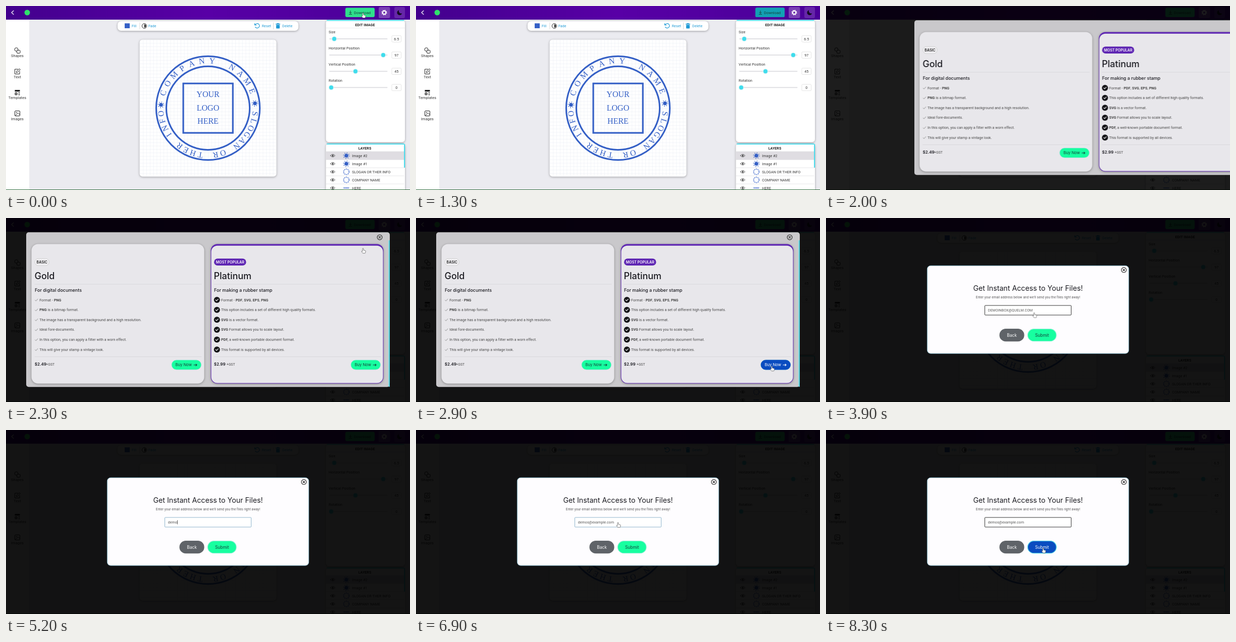
These frames come from a looping animation (800 by 364 pixels, 8.4 s). An HTML page:

```html
<!DOCTYPE html>
<html lang="en">
<head>
<meta charset="utf-8">
<title>Stamp editor</title>
<style>
html, body { margin: 0; width: 100%; height: 100%; overflow: hidden; background: #ebebf0; }
svg { display: block; width: 800px; height: 364px; }
text { font: 7px Roboto, sans-serif; letter-spacing: .1px; fill: #333; white-space: pre; }
.b { font-weight: 700; fill: #222; }
.m { text-anchor: middle; }
.side { font-size: 7.4px; }
.link { fill: #1f9ad6; }
.geo { font-family: Inter, sans-serif; letter-spacing: 0; fill: #1c1c22; }
.serif { font: 16px "Liberation Serif", serif; letter-spacing: 0; fill: #3560c6; }
.list { fill: #444; }
.line { fill: none; stroke: #222; stroke-width: 1; stroke-linecap: round; stroke-linejoin: round; }
.blue { fill: none; stroke: #3560c6; stroke-width: 3.2; }
.card { filter: drop-shadow(0 1px 2px #0005); }

.anim { animation: 8.4s linear infinite; }
.busy { animation-name: busy; }
.shade { animation-name: shade; }
.plans { animation-name: plans; }
.mail { animation-name: mail; }
.hand { animation-name: hand; }
.buy-hover { animation-name: buy; animation-timing-function: step-end; }
.sub-hover { animation-name: submit; animation-timing-function: step-end; }
.field { animation-name: field; animation-timing-function: step-end; }
.hand-on { animation-name: seen; animation-timing-function: step-end; }

@keyframes busy { 0%, 7.1% { opacity: 0 } 8.4%, 21% { opacity: 1 } 21.43%, 100% { opacity: 0 } }
@keyframes shade {
  0%, 21.43% { opacity: 0; animation-timing-function: ease }
  24.6%, 100% { opacity: .92 }
}
@keyframes plans {
  0%, 21.92% { transform: translateX(800px); animation-timing-function: ease }
  25.5%, 34.85% { transform: none; animation-timing-function: ease }
  37.9%, 100% { transform: translateX(800px) }
}
@keyframes mail {
  0%, 34.85% { transform: translateX(-800px); animation-timing-function: ease }
  37.9%, 100% { transform: none }
}
@keyframes hand {
  0%, 7.14% { transform: translate(707px, 14px) }
  27.38% { transform: translate(707px, 60px); animation-timing-function: ease-in-out }
  32.14%, 39.29% { transform: translate(704.5px, 293px); animation-timing-function: ease-in-out }
  47.62%, 82.14% { transform: translate(400px, 183px); animation-timing-function: ease-in-out }
  89.29%, 100% { transform: translate(430px, 233.5px) }
}
@keyframes seen { 0% { opacity: 1 } 7.14% { opacity: 0 } 27.38% { opacity: 1 } 51.19% { opacity: 0 } 82.14%, 100% { opacity: 1 } }
@keyframes buy { 0% { opacity: 0 } 32% { opacity: 1 } 40% { opacity: 0 } 100% { opacity: 0 } }
@keyframes submit { 0% { opacity: 0 } 88.1%, 100% { opacity: 1 } }
@keyframes field { 0% { stroke: #333 } 50% { stroke: #8fb4cc } 94.05%, 100% { stroke: #333 } }
</style>
</head>
<body>
<svg id="stage" viewBox="0 0 800 364"></svg>
<script>
const LOOP = 8400;
const HINT = 'DEMOINBOX@QUELM.COM';
const TYPED = 'demos@example.com';

const text = (x, y, s, cls = '', attrs = '') => `<text x="${x}" y="${y}" class="${cls}" ${attrs}>${s}</text>`;
const rect = (x, y, w, h, r, fill, attrs = '') =>
  `<rect x="${x}" y="${y}" width="${w}" height="${h}" rx="${r}" fill="${fill}" ${attrs}/>`;
const circle = (x, y, r, fill, attrs = '') => `<circle cx="${x}" cy="${y}" r="${r}" fill="${fill}" ${attrs}/>`;
const line = (d, attrs = '') => `<path class="line" d="${d}" ${attrs}/>`;
const at = (x, y, s) => `<g transform="translate(${x} ${y})">${s}</g>`;
const paint = (color, width = 1) => `style="stroke:${color};stroke-width:${width}"`;

const sun = (x, y) => at(x, y, circle(0, 0, 3.8, '#3560c6') +
  circle(0, 0, 5.6, 'none', 'stroke="#3560c6" stroke-width="1.6" stroke-dasharray="1.4 3"'));

const eye = (x, y) => at(x, y,
  line('M-4.5 0Q0-5.4 4.5 0Q0 5.4-4.5 0Z', paint('#333', .8)) + circle(0, 0, 1.6, '#333'));

const close = (x, y) => at(x, y,
  line('M-1.7-1.7L1.7 1.7M1.7-1.7L-1.7 1.7', paint('#222', 1.1)) + circle(0, 0, 4.9, 'none', 'stroke="#222" stroke-width="1.1"'));

// Letters set one by one around the stamp, tops outward
const arc = (s, start, step) => [...s].map((c, i) => c === ' ' ? '' :
  text(0, -88.5, c, 'serif m', `transform="translate(400 202) rotate(${start + i * step + 90})"`)).join('');

function header() {
  return rect(0, 0, 800, 27, 0, 'url(#bar)') +
    line('M15 9.3L11 13L15 16.7', paint('#fff', 1.2)) +
    circle(42, 13, 5.5, '#2fe06c') +
    rect(672, 3.5, 58, 18.5, 3, '#2fe08c') +
    rect(672, 3.5, 58, 18.5, 3, '#12a0b4', 'class="anim busy"') +
    line('M682 9.5V14.5M680 12.6L682 14.6L684 12.6M679.3 16.5H684.7', paint('#14403c')) +
    text(689, 15.7, 'Download', '', 'style="font-size:7.3px;fill:#14403c"') +
    rect(738, 2, 22.5, 22, 3, '#ffffff40') +
    circle(749, 13, 3.2, 'none', 'stroke="#fff" stroke-width="2"') +
    circle(749, 13, 4.8, 'none', 'stroke="#fff" stroke-width="1.5" stroke-dasharray="1.9 1.87"') +
    rect(769, 2, 21, 22, 3, '#ffffff26') +
    '<path d="M778 8.3A5 5 0 1 0 784.2 14.6A5 5 0 0 1 778 8.3Z" fill="#120a20"/>';
}

function sidebar() {
  const icons = [
    circle(-2, -2, 3.4, '#fff', 'stroke="#222"') + rect(-1, -.5, 6.5, 6, 1.5, '#fff', 'stroke="#222"'),
    line('M1-4.5H-5V5H4.5V0M-2 2L-1.5-.5L4-5.5L5.8-3.7L.5 1.5Z'),
    rect(-5, -5, 10, 3.4, 0, '#222') + line('M-4.3 1V4.5H-.8V1ZM2.5 1H4.5M2.5 4.5H4.5', paint('#222', 1.3)),
    rect(-5, -5, 10, 10, 1.5, 'none', 'stroke="#222"') + line('M-4 4L1.5-1L5 2.5') + circle(-1.8, -1.8, 1, '#222')
  ];
  return rect(0, 27, 46, 337, 0, '#fff') + ['Shapes', 'Text', 'Templates', 'Images'].map((s, i) =>
    at(22.5, 88 + i * 41.5, icons[i]) + text(22.5, 101 + i * 41.5, s, 'side m')).join('');
}

function toolbar() {
  return rect(221, 30, 358, 19, 7, '#fff', 'class="card"') +
    rect(235, 34.3, 10, 9.7, 0, '#3560c6') + text(249, 42, 'Fill', 'link') +
    line('M265 33V46M529.5 33V46', paint('#ccc', .8)) +
    circle(274, 39.5, 4.7, '#fff', 'stroke="#222"') +
    '<path d="M274 36.3A3.2 3.2 0 0 1 274 42.7Z" fill="#222"/>' + text(282, 42, 'Fade', 'link') +
    line('M493.3 37.2A4.5 4.5 0 1 1 493.6 41.6M492.5 34.5V37.6H495.8', paint('#1f9ad6', 1.2)) +
    text(506.7, 42, 'Reset', 'link') +
    rect(534, 35, 9, 1.5, .5, '#1f9ad6') + rect(536.5, 34, 4, 1.5, .5, '#1f9ad6') +
    rect(535, 37.3, 7, 7.3, 1, '#1f9ad6') + text(547, 42, 'Delete', 'link');
}

function stamp() {
  return rect(264.5, 66.5, 271, 271, 6, '#fff', 'class="card"') + rect(264.5, 66.5, 271, 271, 6, 'url(#grid)') +
    '<circle class="blue" cx="400" cy="202" r="102.6"/><circle class="blue" cx="400" cy="202" r="82.6"/>' +
    '<rect class="blue" x="351" y="153.2" width="98.2" height="97.8"/>' +
    ['YOUR', 'LOGO', 'HERE'].map((s, i) => text(400, 180 + i * 26.7, s, 'serif m')).join('') +
    arc('COMPANY NAME', -161.4, 12.75) + arc('SLOGAN OR THER INFO', 6.7, 9.26) +
    sun(307, 195.5) + sun(493, 192.5);
}

function settings() {
  const rows = [['Size', 650, '6.5'], ['Horizontal Position', 747, '97'], ['Vertical Position', 692, '45'], ['Rotation', 644, '0']];
  return rect(633.5, 27.5, 156.5, 242, 6, '#fff', 'class="card"') + rect(635, 27.5, 153.5, 2, 1, '#4fdcec') +
    text(711, 39.5, 'EDIT IMAGE', 'b m') + line('M634 43.5H790', paint('#e4e4e8', .7)) +
    rows.map(([name, x, value], i) => {
      const y = 65 + i * 32.1;
      return text(639, y - 11, name) + rect(640, y - 1, 115.5, 2, 1, '#e0e0e4') +
        circle(x, y, 5.2, '#d5f3f6') + circle(x, y, 4, '#3fdcec') +
        rect(764, y - 6.3, 18.5, 12.6, 1.5, '#fff', 'stroke="#ddd" stroke-width=".8"') + text(773.2, y + 2.5, value, 'm');
    }).join('');
}

function layers() {
  const ring = y => circle(674, y, 5.4, 'none', 'stroke="#3560c6" stroke-width="1.5" stroke-dasharray="2 1.4"');
  const bar = y => line(`M668.5 ${y}H680`, 'style="stroke:#3560c6;stroke-width:2;stroke-dasharray:1.6 .7;stroke-linecap:butt"');
  const rows = [['Image #2', y => sun(674, y)], ['Image #1', y => sun(674, y)],
    ['SLOGAN OR THER INFO', ring], ['COMPANY NAME', ring], ['HERE', bar]];
  return rect(633.5, 272, 156.5, 100, 6, '#fff', 'class="card"') + rect(635, 272, 153.5, 2, 1, '#4fdcec') +
    text(710.5, 283.6, 'LAYERS', 'b m') + rect(633.5, 288, 154.5, 16, 0, '#dfdde2') +
    rows.map(([name, icon], i) => {
      const y = 296 + i * 16;
      return line(`M634 ${y - 8}H788`, paint('#dcdce0', .7)) + eye(647, y) + icon(y) + text(685.3, y + 2.5, name);
    }).join('') + rect(788, 273, 2.2, 47, 1, '#4fdcec') + rect(0, 363, 800, 1, 0, '#2c6a3a');
}

function buyButton(x, fill, ink, edge) {
  return rect(x, 281, 58.5, 19, 9.5, fill, `stroke="${edge}" stroke-width=".7"`) +
    text(x + 7.5, 293.4, 'Buy Now', 'geo', `style="font-size:7.7px;fill:${ink}"`) +
    line(`M${x + 44} 290.7H${x + 50}M${x + 48} 288.8L${x + 50} 290.7L${x + 48} 292.6`, paint(ink, 1.1));
}

function plan(x, top, badge, name, use, items, price) {
  const bold = s => s.replace(/\*(.+?)\*/g, '<tspan font-weight="700">$1</tspan>');
  const card = top
    ? rect(x - 6.5, 51.5, 342, 276, 13, '#5f27b3') + rect(x - 5.5, 54.8, 340, 271.6, 12, '#e8e7eb')
    : rect(x - 6.5, 51.5, 342, 276, 13, '#e8e7eb');
  const w = top ? 63.5 : 28.5;
  return `<g class="card">${card}</g>` +
    rect(x, 80.3, w, 13.8, 6.9, top ? '#5f27b3' : '#efeef1', top ? '' : 'stroke="#ccc" stroke-width=".8"') +
    text(x + w / 2, 89.9, badge, 'geo m', `style="font-size:7px;font-weight:600;fill:${top ? '#fff' : '#222'}"`) +
    text(x - .5, 120.5, name, 'geo', 'style="font-size:18px;font-weight:500"') +
    text(x, 145.8, use, 'geo', 'style="font-size:9px;font-weight:500"') +
    line(`M${x} 131H${x + 330}M${x} 274.5H${x + 330}`, paint('#d5d4d8', .8)) +
    items.map((s, i) => {
      const y = 162 + i * 19.65;
      const mark = top
        ? circle(x + 5.7, y, 6, '#151518') + line(`M${x + 3.2} ${y}l1.8 1.9 3.3-3.6`, paint('#fff', 1.1))
        : line(`M${x + .6} ${y + .4}l1.7 1.8 3.6-4`, paint('#888', .9));
      return mark + text(x + (top ? 14 : 9.2), y + 2.5, bold(s), 'list');
    }).join('') +
    text(x - .3, 292.2, price, 'geo', 'style="font-size:8px;font-weight:600"') +
    text(x + (top ? 24.7 : 22.3), 292, '+GST', 'list', 'style="font-size:6.8px"') +
    buyButton(x + 271, '#17ffa0', '#14403c', '#8fe0d8');
}

function plans() {
  return `<g class="anim plans">` + rect(40, 28.3, 720, 306, 5, '#c9c8cb') + rect(757.6, 44, 2.4, 290, 1, '#5fdbe6') +
    close(740, 38.2) +
    plan(57, false, 'BASIC', 'Gold', 'For digital documents', ['Format - *PNG*', '*PNG* is a bitmap format.',
      'The image has a transparent background and a high resolution.', 'Ideal fore-documents.',
      'In this option, you can apply a filter with a worn effect.', 'This will give your stamp a vintage look.'], '$2.49') +
    plan(412, true, 'MOST POPULAR', 'Platinum', 'For making a rubber stamp', ['Format - *PDF*, *SVG*, *EPS*, *PNG*',
      'This option includes a set of different high quality formats.', '*SVG* is a vector format.',
      '*SVG* Format allows you to scale layout.', '*PDF,* a well-known portable document format.',
      'This format is supported by all devices.'], '$2.99') +
    `<g class="anim buy-hover">${buyButton(683, '#0a4cc0', '#fff', '#0a4cc0')}</g></g>`;
}

function mail() {
  const pill = (x, w, s, fill, ink, edge) => rect(x, 219.7, w, 24, 12, fill, `stroke="${edge}" stroke-width="1.2"`) +
    text(x + w / 2, 234.6, s, 'geo m', `style="font-size:8.4px;fill:${ink}"`);
  return '<g class="anim mail">' + rect(200.3, 94.2, 399.4, 174, 7, '#fefdff', 'stroke="#5d9cb4" stroke-width=".8"') +
    close(589.8, 102.8) +
    text(400, 144.3, 'Get Instant Access to Your Files!', 'geo m', 'style="font-size:14.2px"') +
    text(400, 158.6, "Enter your email address below and we'll send you the files right away!", 'm',
      'style="font-size:6.3px;letter-spacing:.15px;fill:#555"') +
    rect(314.5, 173, 171, 19, 1, '#fff', 'class="anim field" stroke-width="1"') +
    text(320.7, 185.2, HINT, '', 'id="entry" style="fill:#555"') +
    rect(0, 178.5, .8, 8, 0, '#222', 'id="caret"') +
    pill(344, 48, 'Back', '#5f6368', '#fff', '#5f6368') +
    pill(399.5, 56.5, 'Submit', '#17ffa0', '#14403c', '#7ff0d0') +
    `<g class="anim sub-hover">${pill(399.5, 56.5, 'Submit', '#0a4cc0', '#fff', '#4fc8e8')}</g></g>`;
}

const hand = `<g class="anim hand"><g class="anim hand-on"><path fill="#fff" stroke="#333" stroke-width=".6"
  d="M-1 .5Q0-.8 1 .5V3.7L4.4 4.5Q5.4 4.8 5.2 5.8L4.6 8.8Q4.4 9.7 3.6 9.7H.2Q-.5 9.7-.9 9.1L-3.1 6.1Q-2.6 4.9-1 5.9Z"/></g></g>`;

const defs = `<defs>
  <linearGradient id="bar"><stop stop-color="#43008d"/><stop offset=".5" stop-color="#5800a6"/><stop offset="1" stop-color="#4a0098"/></linearGradient>
  <pattern id="grid" x="264.5" y="66.5" width="6.775" height="6.775" patternUnits="userSpaceOnUse">
    <path d="M0 0H6.775M0 0V6.775" stroke="#e8ebf3" stroke-width="1"/></pattern></defs>`;

document.getElementById('stage').innerHTML = defs + rect(0, 0, 800, 364, 0, '#ebebf0') + header() + sidebar() +
  toolbar() + stamp() + settings() + layers() +
  rect(0, 0, 800, 364, 0, '#000', 'class="anim shade"') + plans() + mail() + hand;

const entry = document.getElementById('entry');
const caret = document.getElementById('caret');
const start = performance.now();

function type() {
  const t = (performance.now() - start) % LOOP;
  const count = Math.max(0, Math.min(TYPED.length, Math.floor((t - 4700) / 125)));
  const shown = count ? TYPED.slice(0, count) : HINT;
  if (entry.textContent !== shown) entry.textContent = shown;
  const typing = count > 0 && count < TYPED.length;
  const focused = t >= 4200 && t < 7900;
  caret.setAttribute('x', 320.7 + (count ? entry.getComputedTextLength() : 0));
  caret.setAttribute('opacity', focused && (typing || t % 1000 < 500) ? 1 : 0);
  requestAnimationFrame(type);
}
type();
</script>
</body>
</html>
```
